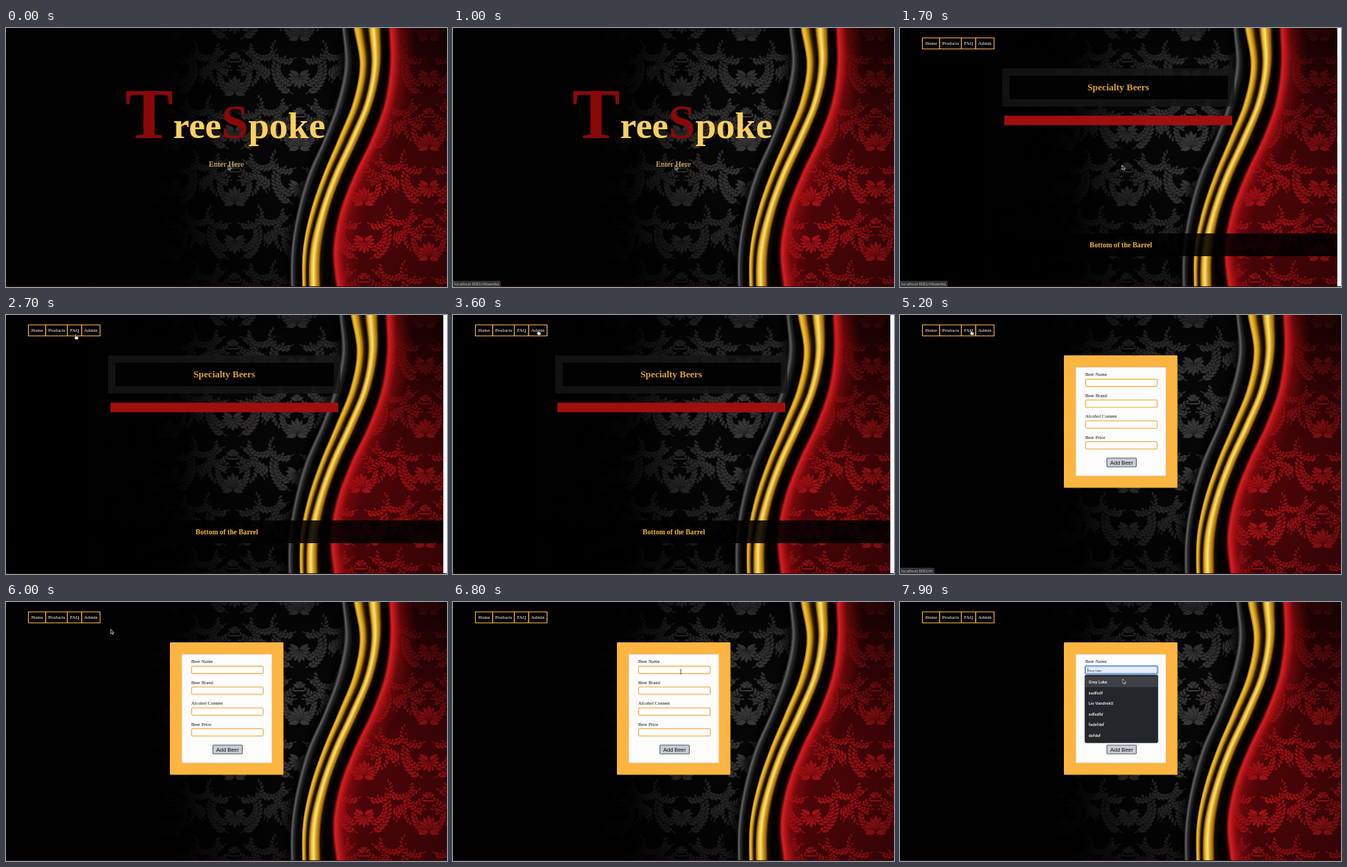
An HTML page with a canvas that plays this animation: 600 by 353 pixels, repeating every 8000 ms.

```html
<!DOCTYPE html>
<html lang="en">
<head>
<meta charset="utf-8">
<style>
  html, body { margin: 0; width: 600px; height: 353px; overflow: hidden; background: #000; }
  canvas { display: block; }
</style>
</head>
<body>
<canvas id="stage" width="600" height="353"></canvas>
<script>
const W = 600, H = 353, LOOP = 8000;
const SERIF = '"Liberation Serif", serif', SANS = '"Liberation Sans", sans-serif', UI = 'Inter, sans-serif';
const GOLD = '#fbb540';
const g = document.getElementById('stage').getContext('2d');

function layer(w, h) {
  const c = document.createElement('canvas');
  c.width = w;
  c.height = h;
  return c.getContext('2d');
}

// Damask wallpaper
function leaf(c, x, y, angle, len, bend) {
  c.save();
  c.translate(x, y);
  c.rotate(angle);
  c.beginPath();
  c.moveTo(0, 0);
  c.bezierCurveTo(len * .1, -bend * 1.2, len * .7, -bend * 1.3, len, -bend * .2);
  c.bezierCurveTo(len * .8, -bend * .2, len * .5, bend * .9, 0, 0);
  c.fill();
  c.strokeStyle = 'rgba(0,0,0,.55)';
  c.lineWidth = .7;
  c.stroke();
  c.restore();
}

// A stem that curls inwards and carries leaves on both sides
function scroll(c, x, y, angle, step, turn, n, size = 13) {
  c.beginPath();
  c.moveTo(x, y);
  const nodes = [], side = Math.sign(turn);
  for (let i = 0; i < n; i++) {
    x += step * Math.cos(angle);
    y += step * Math.sin(angle);
    angle += turn * (.6 + .8 * i / n);
    c.lineTo(x, y);
    nodes.push([x, y, angle, size * (1 - i / n * .5)]);
  }
  c.stroke();
  for (const [px, py, a, s] of nodes) {
    leaf(c, px, py, a - side * .7, s, -side * s * .38);
    leaf(c, px, py, a + side * .6, s * .55, side * s * .28);
  }
}

function motif(c, x, y) {
  for (const flip of [1, -1]) {
    c.save();
    c.translate(x, y);
    c.scale(flip, 1);
    // outer foliage
    scroll(c, 8, 70, -.5, 5.5, -.16, 11);
    scroll(c, 40, 52, -1.2, 5, .28, 9);
    scroll(c, 10, -66, .5, 5.5, .2, 10);
    scroll(c, 44, -20, -1.9, 5, -.2, 9);
    scroll(c, 30, 8, .9, 5, -.3, 9);
    // inner scrolls around the heart
    scroll(c, 3, 56, -.1, 5, -.27, 10);
    scroll(c, 4, 20, .5, 5, -.3, 10, 11);
    scroll(c, 3, -8, -.6, 5, -.22, 10);
    scroll(c, 3, -38, .2, 4.5, -.34, 9, 11);
    for (let i = 0; i < 6; i++) {
      leaf(c, 0, -6, -1.5 + i * .36, 25 - i * 2, 6);
      leaf(c, 0, 44, 1.5 - i * .42, 20 - i, -5);
    }
    for (let i = 0; i < 3; i++) leaf(c, 0, -52, -1.5 + i * .5, 11, 4);
    c.fillRect(0, -50, 7, 2);
    c.restore();
  }
}

function damask(color) {
  const c = layer(176, 150);
  c.fillStyle = c.strokeStyle = color;
  c.lineWidth = 1.3;
  for (const x of [0, 88, 176])
    for (let y = x === 88 ? -75 : -150; y <= 300; y += 150) motif(c, x, y);
  const p = c.createPattern(c.canvas, 'repeat');
  p.setTransform(new DOMMatrix().translate(135, 95));
  return p;
}

// Ribbon edges: x sampled every 50 px downwards
const EDGE = {
  black: [457, 460, 450, 432, 410, 396, 388, 387, 392],
  goldL: [473, 481, 472, 452, 431, 414, 404, 403, 407],
  split: [493, 497, 488, 467, 444, 426, 414, 412, 416],
  goldR: [510, 510, 500, 480, 457, 439, 429, 428, 432],
  red: [522, 523, 516, 498, 474, 455, 446, 450, 460]
};

function edge(name, y) {
  const p = EDGE[name], i = Math.floor(y / 50), u = y / 50 - i;
  const b = p[i], d = p[i + 1], a = p[i - 1] ?? 2 * b - d, e = p[i + 2] ?? 2 * d - b;
  return b + .5 * u * (d - a + u * (2 * a - 5 * b + 4 * d - e + u * (3 * (b - d) + e - a)));
}

function shade(grad, stops) {
  for (const [k, color] of stops) grad.addColorStop(k, color);
  return grad;
}

function band(c, left, right, stops) {
  for (let y = 0; y < H; y++) {
    const a = left(y), b = right(y);
    c.fillStyle = shade(c.createLinearGradient(a, 0, b, 0), stops);
    c.fillRect(a, y, b - a, 1);
  }
}

function wallpaper() {
  const c = layer(W, H);
  const fill = style => { c.fillStyle = style; c.fillRect(0, 0, W, H); };
  fill('#080707');
  fill(damask('#403d3f'));
  fill(shade(c.createLinearGradient(200, 0, 400, 0),
    [[0, 'rgba(0,0,0,.96)'], [.2, 'rgba(0,0,0,.85)'], [.5, 'rgba(0,0,0,.35)'], [1, 'rgba(0,0,0,.1)']]));
  fill(shade(c.createRadialGradient(375, 150, 60, 375, 150, 270),
    [[0, 'rgba(0,0,0,0)'], [1, 'rgba(0,0,0,.8)']]));

  c.save();
  c.beginPath();
  c.moveTo(W, 0);
  for (let y = 0; y <= H; y++) c.lineTo(edge('red', y), y);
  c.lineTo(W, H);
  c.clip();
  fill('#4a0508');
  fill(damask('#a01216'));
  fill(shade(c.createRadialGradient(475, 250, 40, 475, 250, 300),
    [[0, 'rgba(10,0,0,0)'], [.45, 'rgba(10,0,0,.35)'], [1, 'rgba(5,0,0,.9)']]));
  c.restore();

  const at = (name, shift = 0) => y => edge(name, y) + shift;
  band(c, at('black', -14), at('black'), [[0, 'rgba(0,0,0,0)'], [1, 'rgba(0,0,0,.7)']]);
  band(c, at('black'), at('goldL'),
    [[0, '#111'], [.14, '#626263'], [.3, '#262627'], [.55, '#060606'], [1, '#000']]);
  band(c, at('goldR'), at('red'), [[0, '#1a0f02'], [.3, '#000'], [.8, '#0a0000'], [1, '#500508']]);
  band(c, at('goldL'), at('split'),
    [[0, '#7a5008'], [.15, '#f3c334'], [.32, '#e0a81f'], [.5, '#a06d0e'], [.64, '#3a2403'], [.85, '#0c0700'], [1, '#2a1a02']]);
  band(c, at('split'), at('goldR'),
    [[0, '#6b4506'], [.2, '#e9b52b'], [.42, '#ffe57c'], [.6, '#dca321'], [.85, '#9a680d'], [1, '#2c1a02']]);
  band(c, at('red', -1), at('red', 36),
    [[0, '#6d080a'], [.08, '#d61f22'], [.2, '#b01317'], [.4, 'rgba(150,12,16,.55)'], [1, 'rgba(120,8,12,0)']]);
  c.fillStyle = '#351012';
  c.fillRect(0, H - 1, W, 1);
  return c.canvas;
}

const paper = wallpaper();

// Drawing helpers
function text(s, x, y, font, color, align = 'left') {
  g.font = font;
  g.fillStyle = color;
  g.textAlign = align;
  g.fillText(s, x, y);
}

function box(x, y, w, h, fill, line, r = 0, lw = 1) {
  g.beginPath();
  g.roundRect(x, y, w, h, r);
  if (fill) { g.fillStyle = fill; g.fill(); }
  if (line) { g.strokeStyle = line; g.lineWidth = lw; g.stroke(); }
}

function nav(third) {
  const stops = third === 'FAQ' ? [30.5, 54, 83.5, 103, 128] : [30.5, 54, 83.5, 115.5, 140.5];
  ['Home', 'Products', third, 'Admin'].forEach((label, i) => {
    const x = stops[i], w = stops[i + 1] - x;
    box(x, 13.5, w, 15, '#000', '#eda93c', 0, 1.2);
    text(label, x + w / 2, 23.2, '6.6px ' + SERIF, '#fff', 'center');
  });
}

function status(path) {
  const s = 'localhost:8081/#/' + path;
  g.font = '5.6px ' + SANS;
  box(-2, 345, g.measureText(s).width + 6, 10, '#303236', '#48494c', 1.5, .6);
  text(s, 2, 351, g.font, '#b4b6b9');
}

// Pages
function landing() {
  g.drawImage(paper, 0, 0);
  let x = 162;
  for (const [s, size, color] of [['T', 98, '#8a0808'], ['ree', 50, '#fbd05f'], ['S', 66, '#8a0808'], ['poke', 51, '#fbd05f']]) {
    text(s, x, 150, `bold ${size}px ${SERIF}`, color);
    x += g.measureText(s).width;
  }
  text('Enter Here', 300, 189, '11px ' + SERIF, '#ffd468', 'center');
}

function list(employee) {
  g.drawImage(paper, 0, 0, 595, H);
  box(139, 55, 316, 52, 'rgba(22,22,23,.82)', null, 2);
  box(149, 65, 297, 32, 'rgba(0,0,0,.9)');
  text('Specialty Beers', 297, 85, 'bold 12.9px ' + SERIF, '#dba339', 'center');
  box(142, 119.5, 310, 13, '#a00f10');
  box(0, 280, 595, 31, 'rgba(0,0,0,.86)');
  text('Bottom of the Barrel', 300.5, 299, 'bold 9.6px ' + SERIF, '#f4b53c', 'center');
  box(595, 0, 5, 352, '#fbfbfb');
  nav(employee ? 'Add Beer' : 'FAQ');
  if (employee) text('Employers Only', 584, 12, '5.3px ' + SERIF, '#f4c04c', 'right');
}

function form(focused, preview) {
  g.drawImage(paper, 0, 0);
  nav('FAQ');
  box(223, 55, 154.5, 180.5, GOLD, null, 1);
  box(239.5, 71.5, 122, 147.5, '#fdfdfe', '#e6e0da');
  ['Beer Name', 'Beer Brand', 'Alcohol Content', 'Beer Price'].forEach((label, i) => {
    const y = 83.3 + i * 28.4;
    text(label, 252, y, '6.5px ' + SERIF, '#111');
    box(252.5, y + 4.2, 97.5, 10, '#fff', '#eeb650', 1.5, 1.3);
  });
  box(281.5, 195, 40, 12, '#c6cdd3', '#5d6064', .5);
  text('Add Beer', 301.5, 203.8, '7.4px ' + SANS, '#111', 'center');
  if (focused) suggestions(preview);
}

function suggestions(preview) {
  box(252, 87.3, 98.5, 10.4, preview ? '#e5edfc' : '#fff', '#6f9be8', 1.5, 2);
  box(255.3, 89.5, .6, 6, '#333');
  if (preview) text('Grey Lake', 256.3, 94.5, '3.9px ' + SANS, '#222');
  box(251.5, 99.5, 99.5, 92.5, '#24272a', '#3a3d40', 2, .6);
  if (preview) box(252, 101.5, 98.5, 14.5, '#3e4144');
  ['Grey Lake', 'sadfsdf', 'Lio Vandrek0', 'sdfsdfd', 'fadsfdsf', 'dsfdsf'].forEach((s, i) =>
    text(s, 256.5, 111 + i * 14.5, '600 5.3px ' + UI, '#f1f2f3'));
}

// Pointer: time, x, y
const PATH = [
  [0, 302, 187], [1900, 302, 187], [2550, 94, 27], [2800, 94, 27], [3400, 115, 21], [3900, 115, 21],
  [4300, 88, 22], [4850, 88, 22], [5100, 96, 21], [5700, 96, 21], [6700, 310, 95], [7300, 310, 95],
  [7700, 303, 105], [LOOP, 303, 105]
];

const SHAPES = {
  arrow: new Path2D('M0 0V6.2L1.5 4.9L2.5 7.2L3.5 6.8L2.6 4.6H4.5Z'),
  hand: new Path2D('M0 0Q.8-.8 1.4 0V2L4.2 2.7Q4.8 3 4.6 4L3.8 6.5H.7L-1.4 3.8Q-1.2 2.8 0 3.6Z'),
  beam: new Path2D('M-1.4-3Q-.3-3 0-2.4Q.3-3 1.4-3M0-2.4V2.4M-1.4 3Q-.3 3 0 2.4Q.3 3 1.4 3')
};

function pointer(t) {
  const i = PATH.findIndex(p => p[0] > t);
  const [t0, x0, y0] = PATH[i - 1], [t1, x1, y1] = PATH[i];
  let u = (t - t0) / (t1 - t0);
  u = u * u * (3 - 2 * u);
  const x = x0 + (x1 - x0) * u, y = y0 + (y1 - y0) * u;
  const inField = t > 5700 && t < 7500 && x > 252 && y > 87 && y < 98;
  const onNav = x < 141 && y < 29;
  const kind = inField ? 'beam' : onNav ? 'hand' : 'arrow';
  g.save();
  g.translate(x, y);
  g.fillStyle = kind === 'hand' ? '#fff' : '#111';
  g.strokeStyle = kind === 'arrow' ? '#ddd' : '#222';
  g.lineWidth = .7;
  if (kind !== 'beam') g.fill(SHAPES[kind]);
  g.stroke(SHAPES[kind]);
  g.restore();
}

function draw(t) {
  if (t < 1300) landing();
  else if (t < 4900) list(t >= 4000);
  else form(t >= 7300, t >= 7600);

  if (t >= 600 && t < 2000) status('beerlist');
  else if (t >= 4300 && t < 4900) status('newbeer');
  else if (t >= 5100 && t < 5800) status('');
  pointer(t);
}

const start = performance.now();
function tick() {
  draw((performance.now() - start) % LOOP);
  requestAnimationFrame(tick);
}
tick();
</script>
</body>
</html>
```
